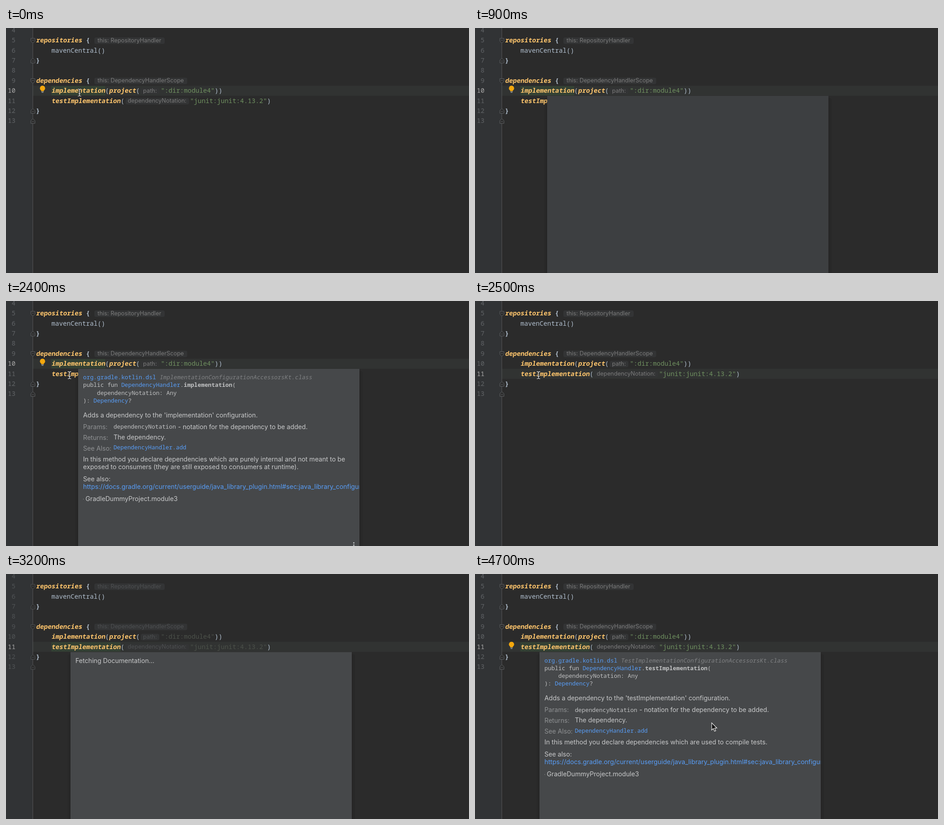
Animation of 1027 by 545 pixels, one loop 4800 ms. Source, as an HTML page:

```html
<!DOCTYPE html>
<html lang="en">
<head>
<meta charset="utf-8">
<title>Quick documentation</title>
<style>
  html, body { margin: 0; width: 100%; height: 100%; overflow: hidden; background: #2b2b2b; }
  #stage { display: block; width: 1027px; height: 545px; }
  text { white-space: pre; }
  .code { font: 500 14.22px "Noto Sans Mono", "DejaVu Sans Mono", monospace; fill: #b0becd; }
  .call { font-weight: 650; fill: #ffc66d; }
  .brace { font-weight: 700; }
  .str { fill: #6f9060; }
  .num { fill: #606366; text-anchor: end; }
  .num.on { fill: #a8a7a7; }
  .hint { font: 12.8px Inter, Roboto, sans-serif; fill: #7b7b7b; }
  .fold { fill: #2b2b2b; stroke: #606366; }
  .dim .hint { fill: #4e5052; }
  .dim .str { fill: #4c514a; }
  .dim .num:not(.on) { fill: #505355; }
  .dim .fold { stroke: #505355; }
  .doc { font: 14.13px Inter, Roboto, sans-serif; fill: #c8c9ca; }
  .mono { font: 500 12.83px "Noto Sans Mono", "DejaVu Sans Mono", monospace; fill: #c0c1c2; }
  .label { fill: #8f9193; }
  .link { fill: #589df6; }
  .doc.link { font-size: 14.22px; }
  .file { fill: #808284; font-weight: 400; }
  .bold { font-weight: 700; }
</style>
</head>
<body>
<svg id="stage" viewBox="0 0 1027 545"></svg>
<script>
const LOOP = 4800, COL = 8.532, PITCH = 22.4;
const stage = document.getElementById('stage');
const find = id => document.getElementById(id);

const midY = line => 139.5 + PITCH * (line - 10);
const baseY = line => midY(line) + 4.7;
const colX = col => 66.5 + COL * col;
const span = (cls, s) => `<tspan class="${cls}">${s}</tspan>`;
const text = (cls, x, y, s) => `<text class="${cls}" x="${x}" y="${y}">${s}</text>`;
const slanted = (cls, x, y, s) =>
  `<text class="${cls}" transform="translate(${x} ${y}) skewX(-9)">${s}</text>`;
const rect = (x, y, w, h, fill, more = '') =>
  `<rect x="${x}" y="${y}" width="${w}" height="${h}" fill="${fill}" ${more}/>`;
const code = (line, x, s) => text('code', x, baseY(line), s);
const call = (line, col, s) => slanted('code call', colX(col), baseY(line), s);

function hint(line, x, w, s) {
  const y = midY(line);
  return rect(x, y - 6.5, w, 14.5, '#333435', 'rx="4"') +
    text('hint', x + (w > 145 ? 7 : 5), y + 4.3, s);
}

function fold(line, opens) {
  const flip = opens ? 1 : -1;
  return `<g class="fold" transform="translate(59.7 ${midY(line) + .5}) scale(1 ${flip})">
    <path d="M-4.5-5h9v6.3L0 5.5-4.5 1.3z"/><path d="M-2.2-.8h4.4"/></g>`;
}

function editor() {
  let out = rect(0, 0, 1027, 545, '#2b2b2b') + rect(0, 0, 59, 545, '#313335') +
    rect(60, 0, 967, PITCH, '#313332', 'id="row"') +
    rect(59, 0, 1, 545, '#555555') +
    rect(colX(4), 0, 0, 21, '#344134', 'id="usage"');
  for (let n = 4; n <= 13; n++)
    out += `<text class="code num" id="n${n}" x="21" y="${baseY(n)}">${n}</text>`;
  out += fold(5, true) + fold(7) + fold(9, true) + fold(12) + fold(13);
  const brace = (line, col, s) => code(line, colX(col), span('brace', s));
  return out +
    call(5, 0, 'repositories') + brace(5, 13, '{') + hint(5, 196, 156, 'this: RepositoryHandler') +
    code(6, colX(4), 'mavenCentral()') +
    brace(7, 0, '}') +
    call(9, 0, 'dependencies') + brace(9, 13, '{') + hint(9, 196, 206, 'this: DependencyHandlerScope') +
    call(10, 4, 'implementation') + code(10, colX(18), '(') +
    call(10, 19, 'project') + code(10, colX(26), '(') +
    hint(10, 299, 41, 'path:') +
    code(10, 343.4, span('str', '":dir:module4"') + '))') +
    call(11, 4, 'testImplementation') + code(11, colX(22), '(') +
    hint(11, 265, 141, 'dependencyNotation:') +
    code(11, 408.3, span('str', '"junit:junit:4.13.2"') + ')') +
    brace(12, 0, '}');
}

const bulb = `<g id="bulb"><path d="M81 128.3a5.8 5.8 0 0 1 3.6 10.3q-.9.8-.9 1.9h-5.4q0-1.1-.9-1.9A5.8 5.8 0 0 1 81 128.3z"
  fill="#f4a70d"/><path d="M78.3 141.6h5.4M79 143.5h4" stroke="#a0a3a5" stroke-width="1.1"/></g>`;

// Documentation body, in coordinates of the popup's corner.
function docBody(method, file, notes) {
  const below = 206 + 17.1 * (notes.length - 1);
  const row = (y, s) => text('mono', 11, y, s);
  return row(23.3, span('link', 'org.gradle.kotlin.dsl')) + slanted('mono file', 180.4, 23.3, file) +
    row(40.4, 'public fun ' + span('link', 'DependencyHandler') + '.' + span('bold', method) + '(') +
    row(57.5, '    dependencyNotation: Any') +
    row(74.6, '): ' + span('link', 'Dependency') + '?') +
    text('doc', 11, 108, `Adds a dependency to the '${method}' configuration.`) +
    text('doc label', 11, 133.7, 'Params:') + text('mono', 78.4, 133.3, 'dependencyNotation') +
    text('doc', 221.5, 133.7, '- notation for the dependency to be added.') +
    text('doc label', 11, 158, 'Returns:') + text('doc', 78.4, 157, 'The dependency.') +
    text('doc label', 11, 181.7, 'See Also:') + text('mono link', 78.4, 179.4, 'DependencyHandler.add') +
    notes.map((s, i) => text('doc', 11, 206 + 17.1 * i, s)).join('') +
    text('doc', 11, below + 26.8, 'See also:') +
    text('doc link', 11, below + 44,
      'https://docs.gradle.org/current/userguide/java_library_plugin.html#sec:java_library_configurations_graph') +
    rect(11, below + 66, 1.2, 1.2, '#999') +
    text('doc', 16.3, below + 71, 'GradleDummyProject.module3');
}

function popup(id, x, y, body, waiting) {
  const dots = [387, 392].map(cy => `<circle cx="611.5" cy="${cy}" r="1.6" fill="#c4c6c8"/>`).join('');
  return `<g id="${id}">` + rect(x - 6, y + 5, 637, 420, '#000', 'opacity=".08" rx="4"') +
    rect(x - 2, y + 1, 628, 420, '#000', 'opacity=".08" rx="2"') +
    `<svg x="${x}" y="${y}" width="624" height="420">` +
    rect(0, 0, 624, 420, '#46484a', `id="${id}Fill"`) +
    `<g id="${id}Wait">${waiting}</g><g id="${id}Body">${body}${dots}</g></svg></g>`;
}

const beamPath = 'M-3.6-8Q-.6-8 0-6.4 .6-8 3.6-8M0-6.4V6.4M-3.6 8Q-.6 8 0 6.4 .6 8 3.6 8M-2.2 2.6H2.2';
const pointers = `<g id="beam" fill="none"><path d="${beamPath}" stroke="#111" stroke-width="2.8"/>
  <path d="${beamPath}" stroke="#f4f4f4" stroke-width="1.3"/></g>
  <path id="arrow" d="M0 0V16.2L3.7 12.8 6.3 18.8 9 17.6 6.5 11.8H11.6z" fill="#111" stroke="#fff" stroke-width="1.1"/>`;

stage.innerHTML = `<g id="editor">${editor()}</g>` + bulb +
  popup('first', 160, 151, docBody('implementation', 'ImplementationConfigurationAccessorsKt.class', [
    'In this method you declare dependencies which are purely internal and not meant to be',
    'exposed to consumers (they are still exposed to consumers at runtime).']), '') +
  popup('second', 143, 173.4, docBody('testImplementation', 'TestImplementationConfigurationAccessorsKt.class', [
    'In this method you declare dependencies which are used to compile tests.']),
    text('doc', 11, 24.3, 'Fetching Documentation...')) + pointers;

// Each table row: start time, then the values held until the next row.
const pointerSteps = [
  [0, 'beam', 163, 143.7], [900, ''],
  [1600, 'beam', 160, 143], [1700, 'beam', 156, 147], [1800, 'beam', 147, 156],
  [1900, 'beam', 139, 167], [2000, 'beam', 140.8, 165], [3200, ''],
  [4400, 'beam', 138, 160], [4500, 'arrow', 310, 245],
  [4600, 'arrow', 590, 375], [4700, 'arrow', 525, 331]
];
const firstSteps = [[0, ''], [900, 'wait'], [1000, 'body'], [2500, '']];
const secondSteps = [[0, ''], [3200, 'wait'], [3300, 'body']];
const caretSteps = [[0, 10], [2500, 11]];
const usageSteps = [[0, 10], [2500, 0], [2600, 11]];
const bulbSteps = [[0, 10], [2500, 0], [3500, 11]];

const at = (steps, t) => steps.filter(s => s[0] <= t).pop().slice(1);
const show = (id, on) => find(id).setAttribute('visibility', on ? 'inherit' : 'hidden');
const place = (id, x, y) => find(id).setAttribute('transform', `translate(${x} ${y})`);

function setPopup(id, state) {
  show(id, state);
  show(id + 'Wait', state === 'wait');
  show(id + 'Body', state === 'body');
}

function draw(t) {
  const [caret] = at(caretSteps, t), [usage] = at(usageSteps, t), [lamp] = at(bulbSteps, t);
  find('row').setAttribute('y', midY(caret) - 11.2);
  for (const n of [10, 11]) find('n' + n).classList.toggle('on', n === caret);
  show('usage', usage);
  find('usage').setAttribute('y', midY(usage) - 10.5);
  find('usage').setAttribute('width', COL * (usage === 11 ? 18 : 14));
  show('bulb', lamp);
  place('bulb', 0, lamp === 11 ? PITCH : 0);

  const [first] = at(firstSteps, t), [second] = at(secondSteps, t);
  setPopup('first', first);
  setPopup('second', second);
  find('firstFill').setAttribute('fill', first === 'wait' ? '#3d3f41' : '#46484a');
  find('editor').classList.toggle('dim', second === 'wait');

  const [kind, x, y] = at(pointerSteps, t);
  for (const id of ['beam', 'arrow']) show(id, id === kind);
  if (kind) place(kind, x, y);
}

const start = performance.now();
function tick() {
  draw((performance.now() - start) % LOOP);
  requestAnimationFrame(tick);
}
tick();
</script>
</body>
</html>
```
